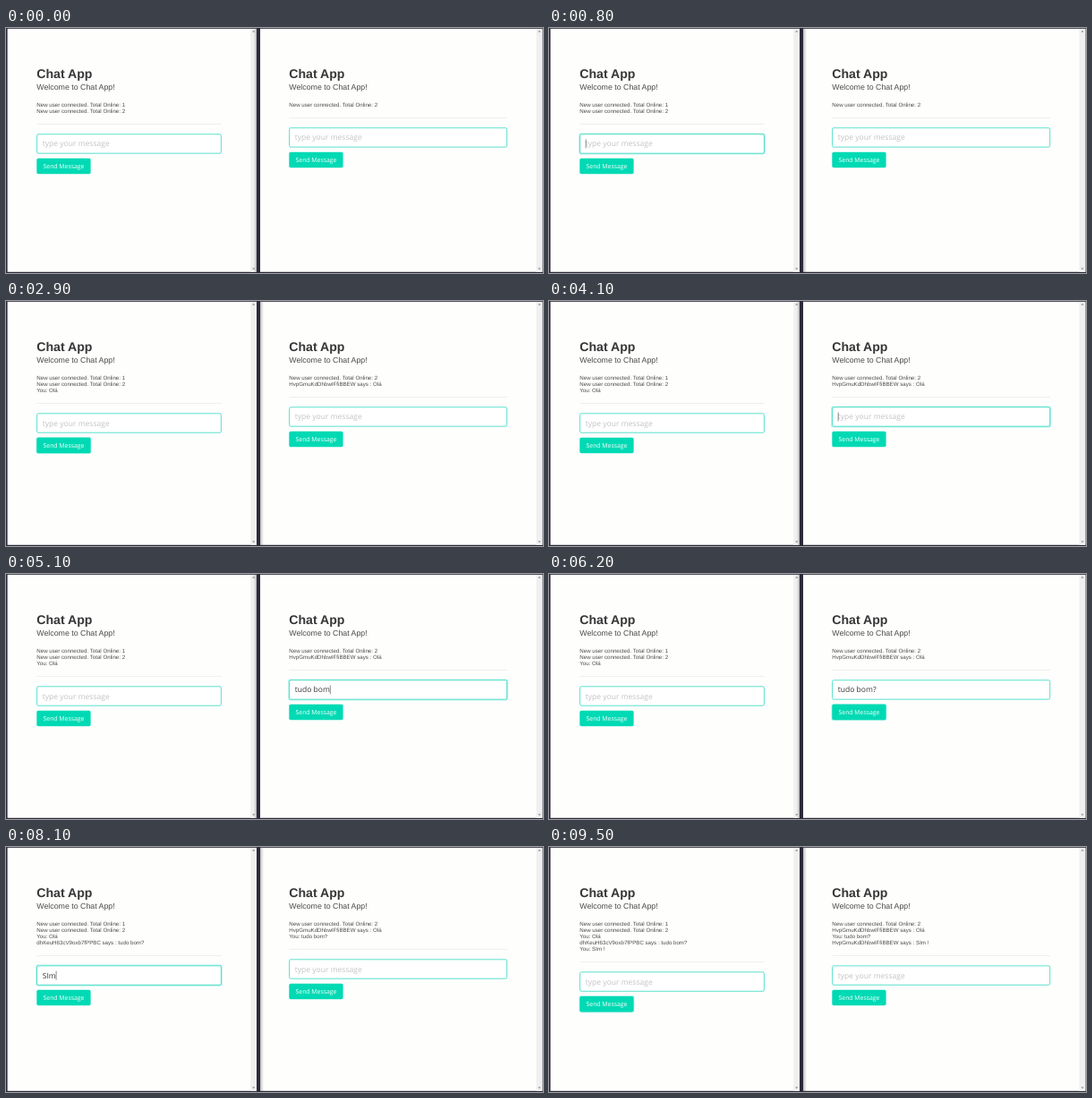
An HTML page with a canvas for the animation above (9800 ms loop, 600 by 274 pixels).

```html
<!DOCTYPE html>
<html lang="en">
<head>
<meta charset="utf-8">
<title>Chat App</title>
<style>
  html, body { margin: 0; width: 100%; height: 100%; overflow: hidden; background: #fefefd; }
  canvas { display: block; width: 600px; height: 274px; }
</style>
</head>
<body>
<canvas width="600" height="274"></canvas>
<script>
const ctx = document.querySelector('canvas').getContext('2d', { alpha: false });
const LOOP = 9800;
const TEAL = '#00dab4', DARK = '#2c2a3a';
const SANS = '"Liberation Sans", Arial, sans-serif';
const HUMANIST = '"Open Sans", "Noto Sans", sans-serif';
const LEFT_ID = 'HvpGmuKdDhbwIFfiBBEW';
const RIGHT_ID = 'dhKeuH63cV9oxb7fPPBC';

const online = n => `New user connected. Total Online: ${n}`;
const panes = {
  left: { x: 34.3, width: 206.4, log: [online(1), online(2)] },
  right: { x: 316.3, width: 243.7, log: [online(2)] },
};

// Each event changes part of one pane from its time onwards.
const type = (time, pane, text, caret = true) => [time, pane, { text, caret }];
const focusInput = (time, pane) => [time, pane, { focus: 'input', caret: true }];
const focusButton = (time, pane) => [time, pane, { focus: 'button', caret: false }];
const blur = (time, pane) => [time, pane, { focus: '', caret: false }];
const receive = (time, pane, message) => [time, pane, { message }];
const send = (time, pane, message) => [time, pane, { text: '', message: `You: ${message}` }];

const events = [
  focusInput(800, 'left'),
  type(1300, 'left', 'O'),
  type(1500, 'left', 'Ol'),
  type(1900, 'left', 'Ola'),
  type(2200, 'left', 'Olá'),
  focusButton(2700, 'left'),
  send(2900, 'left', 'Olá'),
  receive(2900, 'right', `${LEFT_ID} says : Olá`),

  blur(4100, 'left'),
  focusInput(4100, 'right'),
  type(4300, 'right', 't'),
  type(4500, 'right', 'tu'),
  type(4600, 'right', 'tud'),
  type(4700, 'right', 'tudo'),
  type(5100, 'right', 'tudo bom'),
  type(5700, 'right', 'tudo bom', false),
  type(5900, 'right', 'tudo bom?'),
  focusButton(6200, 'right'),
  send(6400, 'right', 'tudo bom?'),
  receive(6400, 'left', `${RIGHT_ID} says : tudo bom?`),
  blur(6800, 'right'),

  focusInput(7500, 'left'),
  type(7800, 'left', 'S'),
  type(8000, 'left', 'SI'),
  type(8100, 'left', 'SIm'),
  type(8400, 'left', 'SIm '),
  type(8700, 'left', 'SIm !'),
  focusButton(9000, 'left'),
  send(9500, 'left', 'SIm !'),
  receive(9500, 'right', `${LEFT_ID} says : SIm !`),
];

function stateAt(name, time) {
  const state = { ...panes[name], text: '', focus: '', caret: false };
  state.log = [...state.log];
  for (const [start, pane, { message, ...change }] of events) {
    if (start > time || pane !== name) continue;
    Object.assign(state, change);
    if (message) state.log.push(message);
  }
  return state;
}

function rect(x, y, w, h, color) {
  ctx.fillStyle = color;
  ctx.fillRect(x, y, w, h);
}

function rounded(x, y, w, h, radius) {
  ctx.beginPath();
  ctx.roundRect(x, y, w, h, radius);
}

function label(text, x, y, font, color, align = 'left') {
  ctx.font = font;
  ctx.fillStyle = color;
  ctx.textAlign = align;
  ctx.fillText(text, x, y);
}

function focusRing(x, y, w, h, spread) {
  rounded(x - spread, y - spread, w + 2 * spread, h + 2 * spread, 2.4);
  ctx.fillStyle = 'rgba(0, 209, 178, .28)';
  ctx.fill();
}

function drawInput({ x, width, text, focus, caret }, y) {
  const height = 22;
  const font = `8.52px ${HUMANIST}`;
  if (focus === 'input') focusRing(x, y, width, height, 1.1);
  rounded(x + .3, y + .3, width - .6, height - .6, 1.6);
  ctx.fillStyle = '#fff';
  ctx.fill();
  ctx.strokeStyle = '#00d1b2';
  ctx.lineWidth = .65;
  ctx.stroke();

  const textX = x + 6.5;
  label(text || 'type your message', textX, y + 14, font, text ? '#363636' : '#c1c3c2');
  if (caret) rect(textX + ctx.measureText(text).width * (text ? 1 : 0), y + 6, .6, 10, '#444');
}

function drawButton({ x, focus }, y) {
  const width = 60.3, height = 17.5;
  if (focus === 'button') focusRing(x, y, width, height, .8);
  rounded(x, y, width, height, 1.8);
  ctx.fillStyle = TEAL;
  ctx.fill();
  label('Send Message', x + width / 2, y + 11.4, `6.87px ${HUMANIST}`, '#fff', 'center');
}

function drawPane(state) {
  const { x, width, log } = state;
  label('Chat App', x, 56.2, `bold 14.08px ${SANS}`, '#363636');
  label('Welcome to Chat App!', x, 69.2, `8.8px ${SANS}`, '#4a4a4a');
  log.forEach((line, i) => label(line, x, 88.2 + i * 7.04, `6.16px ${SANS}`, '#4a4a4a'));

  const ruleY = 93 + log.length * 7.04;
  rect(x, ruleY, width, .9, '#ededed');
  drawInput(state, ruleY + 11.4);
  drawButton(state, ruleY + 38.7);
}

function arrow(x, y, direction) {
  ctx.beginPath();
  ctx.moveTo(x - 1.6, y);
  ctx.lineTo(x + 1.6, y);
  ctx.lineTo(x, y + 1.8 * direction);
  ctx.fillStyle = '#85858a';
  ctx.fill();
}

function drawScrollbar(x) {
  rect(x, 1, 6.8, 272, '#f0f0f0');
  arrow(x + 3.5, 4.5, -1);
  arrow(x + 3.5, 268.5, 1);
}

function shadow(from, to) {
  const fade = ctx.createLinearGradient(from, 0, to, 0);
  fade.addColorStop(0, 'rgba(30, 28, 40, .28)');
  fade.addColorStop(1, 'rgba(30, 28, 40, 0)');
  rect(Math.min(from, to), 1, Math.abs(to - from), 272, fade);
}

function drawWindows(leftActive) {
  rect(0, 0, 600, 274, DARK);
  rect(1.6, .8, 278.4, 272, '#fefefd');
  rect(284, .8, 315.4, 272, '#fefefd');
  drawScrollbar(273.2);
  drawScrollbar(592.5);
  if (leftActive) shadow(284, 288);
  else shadow(280, 277);
}

function draw(now) {
  const time = now % LOOP;
  drawWindows(time >= 800 && time < 4100 || time >= 7500);
  drawPane(stateAt('left', time));
  drawPane(stateAt('right', time));
  requestAnimationFrame(draw);
}

ctx.textRendering = 'geometricPrecision';
draw(performance.now());
</script>
</body>
</html>
```
